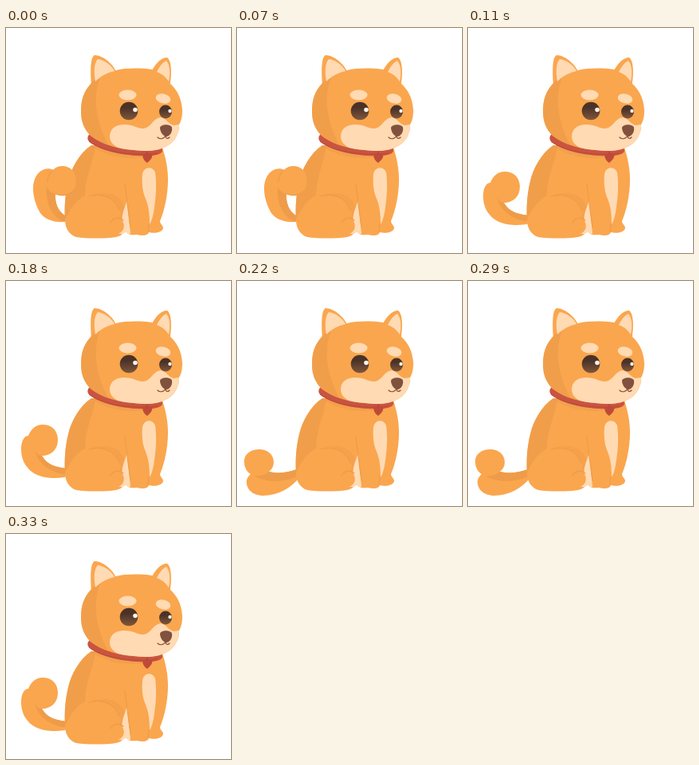
An HTML page for the animation above (440 ms loop, 282 by 282 pixels).

```html
<!DOCTYPE html>
<html lang="en">
<head>
<meta charset="utf-8">
<title>Dog wagging its tail</title>
<style>
  html, body { margin: 0; width: 100%; height: 100%; overflow: hidden; background: #fff; }
  svg { display: block; width: 100%; height: 100%; }
  .fur { fill: #faa64e; }
  .shade { fill: #ee9c4a; }
  .cream { fill: #ffdab3; }
  .crease { fill: none; stroke: #ee9b49; stroke-width: 1.2; stroke-linecap: round; }
  .tail { visibility: hidden; animation: 440ms step-end infinite; }
  .up { animation-name: up; }
  .middle { animation-name: middle; }
  .down { animation-name: down; }
  @keyframes up { 0% { visibility: visible } 25%, 100% { visibility: hidden } }
  @keyframes middle {
    0%, 50%, 100% { visibility: hidden }
    25%, 75% { visibility: visible }
  }
  @keyframes down { 0%, 75%, 100% { visibility: hidden } 50% { visibility: visible } }
</style>
</head>
<body>
<svg viewBox="0 0 282 282">
  <defs>
    <linearGradient id="iris" x2="0" y2="1">
      <stop offset=".3" stop-color="#4a3228"/>
      <stop offset="1" stop-color="#80573a"/>
    </linearGradient>
    <clipPath id="bodyClip">
      <path id="bodyShape" d="M107 147C92 157 82 175 78 192C74 208 73 225 74 240C74 251 79 259 88 262C101 264 125 264 138 262C143 261 145 259 147 257L151 255C152 259 157 260 164 259C172 261 178 260 179 256C186 258 196 256 197 251C197 247 193 246 193 242C199 228 203 208 203 190C203 175 200 162 196 150Z"/>
    </clipPath>
    <clipPath id="headClip">
      <path id="headShape" d="M108 68C97 79 94 91 94 104C94 118 98 127 106 135C122 148 150 154 179 154C198 153 211 145 215 132C217 129 217 124 217 121C220 116 221 110 221 103C220 87 214 77 205 69C198 60 191 55 183 52C168 50 150 50 138 53C124 56 115 61 108 68Z"/>
    </clipPath>
  </defs>

  <g class="tail middle">
    <path class="fur" d="M82 243C75 246 68 247 60 247C34 247 19 232 19 211C19 200 23 194 28 194C31 186 37 180 46 180C57 180 65 187 65 199C65 211 57 219 45 219C51 230 64 235 82 235Z"/>
    <path class="shade" d="M36 212C40 229 56 242 80 243L82 235C64 235 51 230 45 219C41 219 38 216 36 212Z"/>
  </g>
  <g class="tail down">
    <path class="fur" d="M80 244C68 260 51 269 33 269C19 269 11 260 12 250C13 246 15 244 17 242C12 239 9 233 9 226C9 217 17 211 28 211C39 211 46 218 46 227C46 232 44 236 40 239C52 242 66 240 80 234Z"/>
    <path class="shade" d="M22 244C37 254 61 252 78 244L80 234C66 240 52 242 40 239C35 243 28 245 22 244Z"/>
  </g>

  <use href="#bodyShape" class="fur"/>
  <g clip-path="url(#bodyClip)">
    <path class="shade" d="M112 145C111 166 100 182 99 210C86 217 79 229 73 243L65 220L85 150Z" opacity=".7"/>
    <path class="shade" d="M105 147C129 164 166 169 197 155L196 149Z" opacity=".5"/>
    <path class="shade" d="M104 211C121 207 139 213 143 229C145 233 143 236 142 237L149 243C153 229 147 215 137 210C126 205 113 206 104 211Z" opacity=".45"/>
    <path class="cream" d="M171 183C173 173 184 173 187 181C189 196 188 212 186 224C185 233 183 241 180 246C180 234 179 224 175 214C171 205 170 194 171 183Z"/>
    <path class="cream" d="M152 216C153 230 155 244 156 258H141C147 255 149 250 147 244C143 238 148 227 152 216Z"/>
    <path class="crease" d="M104 211C121 206 137 213 142 228M147 241C141 236 134 238 131 244M149 195C151 213 154 235 156 250M179 245L178 255"/>
  </g>

  <g class="tail up">
    <path class="fur" d="M74 243C60 244 49 240 43 232C37 222 34 211 34 201C34 190 39 180 48 177C52 176 56 176 59 178C64 172 76 171 83 178C89 185 89 197 84 204C78 211 69 211 62 208C61 218 65 230 74 235Z"/>
    <path class="shade" d="M51 199C49 220 58 238 74 243V235C65 230 61 218 62 208C57 207 53 203 51 199Z"/>
    <path class="crease" d="M59 178C54 182 52 187 52 193M62 208C70 211 79 210 84 204"/>
  </g>

  <path d="M105 133C101 136 102 141 105 143C120 155 154 162 184 160C190 159 196 157 196 154L195 148Z" fill="#c95440"/>
  <path d="M104 142C119 154 155 161 190 157" fill="none" stroke="#bb4939" stroke-width="1"/>
  <path class="fur" d="M107 73C106 57 105 37 111 34C121 34 135 45 139 57ZM181 57C186 46 195 36 202 37C208 41 208 60 205 74Z"/>
  <use href="#headShape" class="fur"/>
  <g clip-path="url(#headClip)">
    <path class="shade" d="M122 55C109 75 108 113 131 151L85 145V65Z" opacity=".7"/>
    <path class="cream" d="M130 136C130 126 138 121 148 121C160 121 164 126 172 126C182 125 184 113 194 112C201 113 203 120 210 122L222 120V158H180C151 157 130 150 130 136Z"/>
  </g>
  <path class="cream" d="M115 39C123 40 132 46 136 54C126 56 118 61 112 67C110 56 110 44 115 39ZM201 41C206 47 206 58 204 67C200 61 195 57 189 55C192 49 196 43 201 41Z"/>

  <g class="cream">
    <ellipse cx="152.500" cy="84" rx="11" ry="6.5"/>
    <ellipse cx="197" cy="88.500" rx="9.500" ry="6" transform="rotate(14 197 88.5)"/>
  </g>
  <g fill="url(#iris)">
    <circle cx="154" cy="104" r="11.3"/>
    <ellipse cx="200" cy="105" rx="8" ry="8.500"/>
  </g>
  <g fill="#fff4e8">
    <circle cx="162" cy="102.500" r="2.800"/>
    <circle cx="205.500" cy="104" r="2.200"/>
  </g>
  <path d="M193 125C194 120 207 120 208 125C209 130 205 136 201 136C197 136 193 130 193 125Z" fill="#80523e"/>
  <path d="M190 137C193 140 198 139 200 135C200 139 203 139 205 137" fill="none" stroke="#8d4f37" stroke-width="1.2" stroke-linecap="round"/>

  <path d="M177 155V159" stroke="#a9473b" stroke-width="1.5"/>
  <path d="M177 169C171 165 170 159 173 157.500C175 156.500 177 158 177 159.500C178 157 182 156.500 183 159C184 162 181 166 177 169Z" fill="#c04a38"/>
</svg>
</body>
</html>
```
